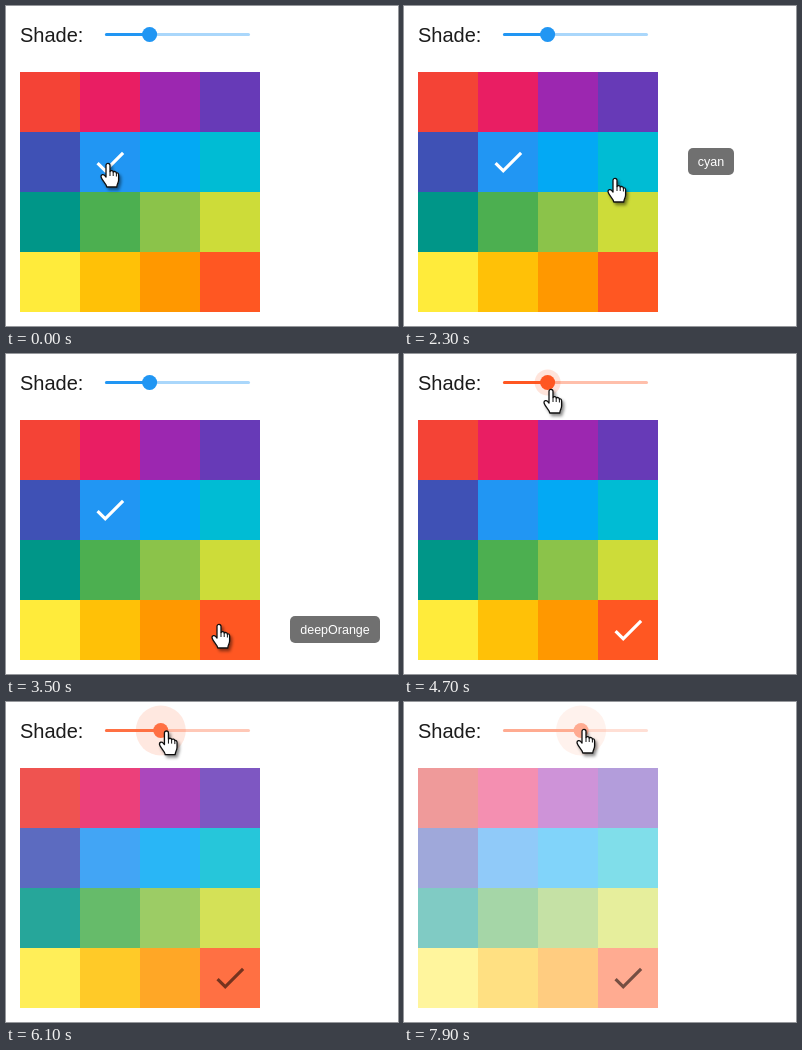
An HTML page for the animation above (8 s loop, 392 px wide and 320 px high).

```html
<!DOCTYPE html>
<html lang="en">
<head>
<meta charset="utf-8">
<title>Shade picker</title>
<style>
  html, body { margin: 0; width: 100%; height: 100%; overflow: hidden; background: #fff; }
  svg { display: block; width: 392px; height: 320px; }
  text { font-family: "Liberation Sans", Arial, sans-serif; }
</style>
</head>
<body>
<svg id="stage" viewBox="0 0 392 320" xmlns="http://www.w3.org/2000/svg">
  <defs>
    <filter id="shadow" x="-50%" y="-50%" width="220%" height="220%">
      <feDropShadow dx="2" dy="2.5" stdDeviation="1.5" flood-color="#000" flood-opacity=".45"/>
    </filter>
  </defs>
  <text x="14" y="36" font-size="20" fill="#1c1c1c">Shade:</text>
  <g id="slider">
    <rect x="99" y="27" width="145" height="3" rx="1.5" opacity=".38"/>
    <rect id="track" x="99" y="27" height="3" rx="1.5"/>
    <circle id="halo" cy="28.5" opacity=".16"/>
    <circle id="thumb" cy="28.5" r="7.5"/>
  </g>
  <g id="cells" shape-rendering="crispEdges"></g>
  <path id="check" d="M9 16.17L4.83 12l-1.42 1.41L9 19 21 7l-1.41-1.41z"/>
  <g id="tips"></g>
  <g id="cursor" filter="url(#shadow)">
    <path fill="#fff" stroke="#111" stroke-width="1.3" stroke-linejoin="round"
      d="M-2 14V2.3C-2-.2 2-.2 2 2.3V8.5C3 7.2 5 7.5 5.2 9C6.4 8 8.1 8.6 8.4 10
         C9.6 9.4 10.6 10.3 10.6 12V17C10.6 20 8.8 21 8.8 24H-1.2
         C-1.6 20.5-7 16.5-7 13.5C-7 11.4-4.5 11-3.2 12.6Z"/>
    <path fill="none" stroke="#111" d="M2 8.5V13M5.2 9V13M8.4 10V13.5"/>
  </g>
</svg>
<script>
const LOOP = 8000, STEP = 100, CELL = 60, LEFT = 14, TOP = 66;
const BLUE = 5, DEEP_ORANGE = 15;

const palette = {
  500: "f44336 e91e63 9c27b0 673ab7 3f51b5 2196f3 03a9f4 00bcd4 009688 4caf50 8bc34a cddc39 ffeb3b ffc107 ff9800 ff5722",
  400: "ef5350 ec407a ab47bc 7e57c2 5c6bc0 42a5f5 29b6f6 26c6da 26a69a 66bb6a 9ccc65 d4e157 ffee58 ffca28 ffa726 ff7043",
  300: "e57373 f06292 ba68c8 9575cd 7986cb 64b5f6 4fc3f7 4dd0e1 4db6ac 81c784 aed581 dce775 fff176 ffd54f ffb74d ff8a65",
  200: "ef9a9a f48fb1 ce93d8 b39ddb 9fa8da 90caf9 81d4fa 80deea 80cbc4 a5d6a7 c5e1a5 e6ee9c fff59d ffe082 ffcc80 ffab91"
};
for (const shade in palette) palette[shade] = palette[shade].split(" ").map(hex => "#" + hex);

// time, x, y of the fingertip
const cursorKeys = [
  [0, 102, 157], [100, 103, 158], [300, 103, 158], [1000, 171, 156], [1100, 171, 156],
  [1400, 174, 153], [1900, 209, 169], [2100, 209, 169], [2300, 211, 172], [2900, 212, 215],
  [3000, 212, 215], [3500, 213, 270], [4000, 213, 270], [4700, 147, 35], [5600, 146, 31],
  [6300, 164, 28], [6400, 164, 28], [6700, 169, 27], [7100, 178, 27], [7900, 180, 27], [8000, 180, 27]
];

const tooltips = [
  { label: "lightBlue", x: 224, y: 142, width: 68, from: 700, to: 1600 },
  { label: "cyan", x: 284, y: 142, width: 46, from: 1650, to: 2500 },
  { label: "lime", x: 284, y: 202, width: 45, from: 2550, to: 3150 },
  { label: "deepOrange", x: 284, y: 262, width: 90, from: 3200, to: 4150 }
];

const $ = id => document.getElementById(id);
const clamp = v => Math.max(0, Math.min(1, v));
const ease = v => v * v * (3 - 2 * v);
const ramp = (t, from, length) => ease(clamp((t - from) / length));
const set = (node, attrs) => { for (const k in attrs) node.setAttribute(k, attrs[k]); };

function add(parent, tag, attrs, text = "") {
  const node = document.createElementNS("http://www.w3.org/2000/svg", tag);
  set(node, attrs);
  node.textContent = text;
  return parent.appendChild(node);
}

const cellPos = i => [LEFT + i % 4 * CELL, TOP + Math.floor(i / 4) * CELL];

const cells = palette[500].map((_, i) => {
  const [x, y] = cellPos(i);
  return add($("cells"), "rect", { x, y, width: CELL, height: CELL });
});

for (const tip of tooltips) {
  tip.node = add($("tips"), "g", {});
  add(tip.node, "rect", { y: -13.5, width: tip.width, height: 27, rx: 5, fill: "#616161", "fill-opacity": .9 });
  add(tip.node, "text", { x: tip.width / 2, y: 4, "font-size": 12.5, fill: "#fff", "text-anchor": "middle" }, tip.label);
}

function cursorAt(t) {
  const i = cursorKeys.findIndex(key => key[0] > t);
  const [t0, x0, y0] = cursorKeys[i - 1], [t1, x1, y1] = cursorKeys[i];
  const p = ease((t - t0) / (t1 - t0));
  return [x0 + (x1 - x0) * p, y0 + (y1 - y0) * p];
}

function shadeAt(t) {
  return t < 5800 ? 500 : t < 6200 ? 400 : t < 6900 ? 300 : 200;
}

function render(t) {
  const shade = shadeAt(t), colors = palette[shade];
  const selected = t < 3900 ? BLUE : DEEP_ORANGE;
  cells.forEach((cell, i) => set(cell, { fill: colors[i] }));

  // nine hundreds down to the lightest accents make 13 slider intervals
  const thumbX = 99 + 145 * (9 - shade / 100) / 13;
  const haloRadius = 7.5 + 10 * ramp(t, 4620, 150) + 7.5 * ramp(t, 5500, 150);
  set($("slider"), { fill: colors[selected] });
  set($("track"), { width: thumbX - 99 });
  set($("thumb"), { cx: thumbX });
  set($("halo"), { cx: thumbX, r: haloRadius });

  const [x, y] = cellPos(selected);
  set($("check"), {
    transform: `translate(${x + 30} ${y + 30}) scale(1.58) translate(-12 -12)`,
    fill: shade === 500 ? "#fff" : "rgba(0,0,0,.54)"
  });

  for (const tip of tooltips) {
    const show = ramp(t, tip.from, 200) * (1 - ramp(t, tip.to, 150));
    const scale = .75 + .25 * show;
    set(tip.node, {
      opacity: show,
      transform: `translate(${tip.x} ${tip.y + 13.5}) scale(${scale} ${scale * scale})`
    });
  }
  set($("cursor"), { transform: `translate(${cursorAt(t)})` });
}

const start = performance.now();
function tick() {
  const elapsed = (performance.now() - start) % LOOP;
  render(Math.floor(elapsed / STEP) * STEP);
  requestAnimationFrame(tick);
}
tick();
</script>
</body>
</html>
```
